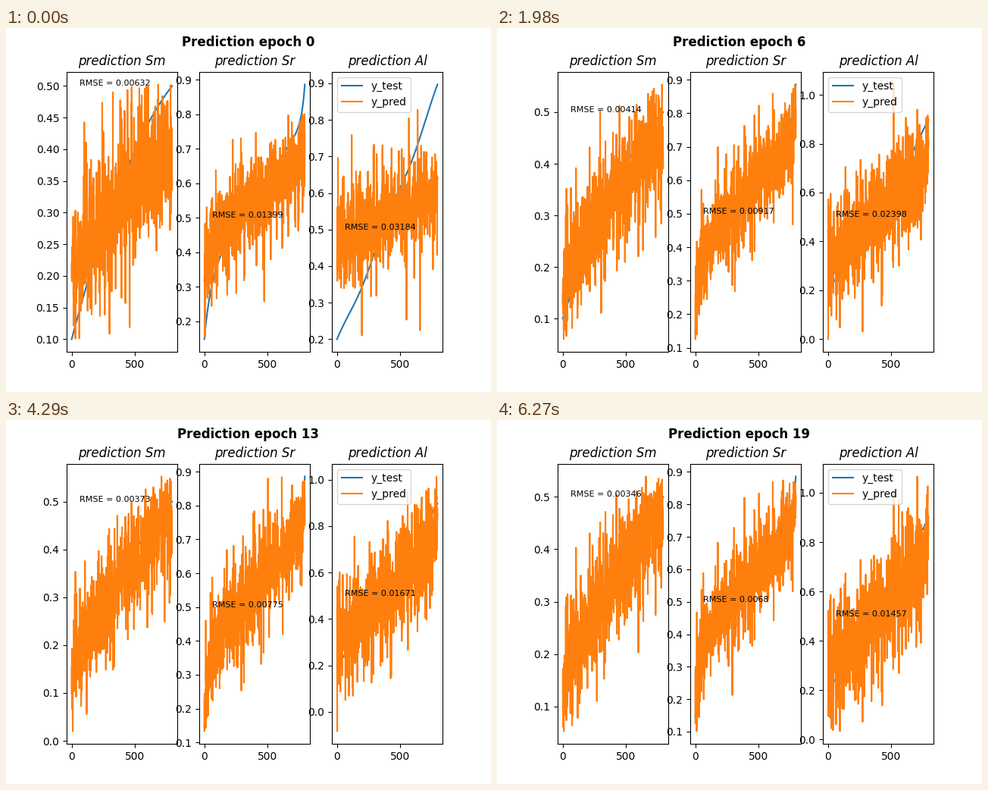
Recreate the animation shown at these times as a matplotlib script. Size 640 by 480 pixels, loop 6.6 s.

```python
import numpy as np
import matplotlib.pyplot as plt
from matplotlib.animation import FuncAnimation

N = 800
EPOCHS = 20
IDX = np.arange(N)
U = IDX / (N - 1)

# Epochs at which axis range and score are known; the rest is interpolated.
KEYS = [0, 2, 4, 8, 11, 13, 17, 19]


def at(epoch, values):
    return np.interp(epoch, KEYS, np.broadcast_to(values, len(KEYS)))


def learned(epoch, start, end):
    """Ease a value from its untrained to its trained level."""
    return end + (start - end) * np.exp(-epoch / 4)


def arch(u):
    return u * (1.5 - 0.5 * u)


def steep_ends(u):
    line = 0.255 + 0.6 * u
    return line - 0.255 * np.exp(-u / 0.07) + 0.145 * np.exp((u - 1) / 0.03)


def wavy(u):
    return u - 0.02 * np.sin(np.pi * u) - 0.015 * (1 - np.cos(4 * np.pi * u))


class Panel:
    def __init__(self, ax, name, seed, shape, first, last, centre, gain, spread,
                 low, high, score):
        self.ax, self.seed = ax, seed
        self.centre, self.gain, self.spread = centre, gain, spread
        self.low, self.high, self.score = low, high, score
        self.first, self.last = first, last
        self.test = first + (last - first) * shape(U)
        self.noise = np.random.default_rng(seed).standard_t(6, N)

        ax.set_title(f"prediction {name}", style="italic")
        ax.plot(IDX, self.test, label="y_test")
        self.line, = ax.plot(IDX, self.test, label="y_pred")
        self.label = ax.text(60, 0.5, "", fontsize=8)

    def predict(self, epoch, lo, hi):
        """Test curve pulled towards its centre, plus noise that settles down."""
        rng = np.random.default_rng(self.seed * 100 + epoch)
        keep = 0.93 * np.sqrt(min(epoch / 6, 1))
        noise = keep * self.noise + np.sqrt(1 - keep**2) * rng.standard_t(6, N)
        mean = self.centre + learned(epoch, *self.gain) * (self.test - self.centre)
        pred = mean + learned(epoch, *self.spread) * noise

        # Fold outliers back into the range, then let one point touch each limit.
        pred = lo + np.abs(pred - lo)
        pred = hi - np.abs(hi - pred)
        if lo < self.first:
            pred[pred.argmin()] = lo
        if hi > self.last:
            pred[pred.argmax()] = hi
        return pred

    def show(self, epoch):
        lo, hi = at(epoch, self.low), at(epoch, self.high)
        self.line.set_ydata(self.predict(epoch, lo, hi))
        margin = 0.05 * (hi - lo)
        self.ax.set_ylim(lo - margin, hi + margin)
        self.label.set_text(f"RMSE = {round(at(epoch, self.score) * 1e-5, 5)}")


fig, axes = plt.subplots(1, 3, figsize=(6.4, 4.8), dpi=100)
title = fig.suptitle("", fontweight="bold")

panels = [
    Panel(axes[0], "Sm", 11, arch, 0.1, 0.5,
          centre=0.3, gain=(0.42, 0.82), spread=(0.047, 0.045),
          low=[.1, .1, .046, .074, .048, .02, .028, .053],
          high=[.5025, .506, .557, .5505, .556, .553, .536, .539],
          score=[632, 480, 425, 402, 380, 373, 358, 346]),
    Panel(axes[1], "Sr", 23, steep_ends, 0.148, 0.886,
          centre=0.55, gain=(0.5, 0.83), spread=(0.056, 0.06),
          low=[.148, .148, .117, .134, .128, .133, .097, .1014],
          high=0.886,
          score=[1399, 1080, 953, 881, 802, 775, 722, 680]),
    Panel(axes[2], "Al", 37, wavy, 0.2, 0.897,
          centre=0.53, gain=(0.19, 0.68), spread=(0.055, 0.095),
          low=[.2, .13, .0226, -.024, -.078, -.083, -.006, .034],
          high=[.897, .93, 1.0226, 1.063, 1.0216, 1.0135, 1.041, 1.066],
          score=[3184, 2840, 2678, 2117, 1872, 1671, 1584, 1457]),
]
axes[2].legend(loc="upper left")


def update(epoch):
    title.set_text(f"Prediction epoch {epoch}")
    for panel in panels:
        panel.show(epoch)


anim = FuncAnimation(fig, update, frames=EPOCHS, init_func=lambda: update(0),
                     interval=330, repeat=True, repeat_delay=0)
plt.show()
```
